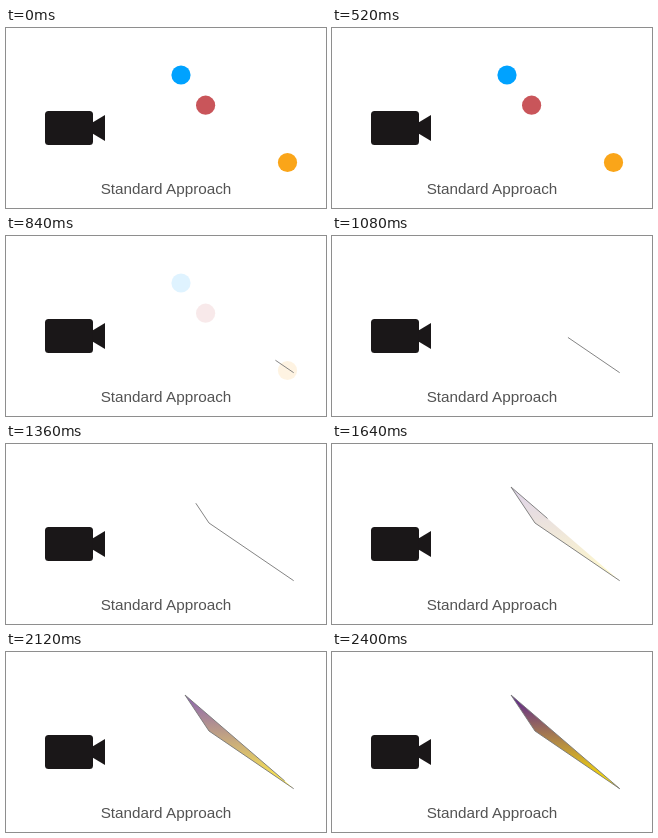
Recreate the animation shown at these times as an HTML page. Size 320x180 px, loop 2920 ms.

```html
<!DOCTYPE html>
<html lang="en">
<head>
<meta charset="utf-8">
<title>Standard Approach</title>
<style>
  html, body { margin: 0; width: 100%; height: 100%; overflow: hidden; background: #fff; }
  svg { display: block; width: 100vw; height: 100vh; }
  text { font: 15.25px "Liberation Sans", Arial, sans-serif; fill: #535353; text-anchor: middle; }
</style>
</head>
<body>
<svg viewBox="0 0 320 180">
  <defs>
    <linearGradient id="shade" gradientUnits="userSpaceOnUse" x1="0" y1="43" x2="0" y2="128">
      <stop offset="0" stop-color="#5a2391"/>
      <stop offset="1" stop-color="#f8da08"/>
    </linearGradient>
  </defs>
  <g fill="#1a1718">
    <rect x="39" y="83" width="48" height="34" rx="3.5"/>
    <path d="M86.5 94.5 99 87V113L86.5 105.5Z"/>
  </g>
  <text x="160" y="165.5">Standard Approach</text>
  <g id="dots">
    <circle cx="175" cy="47" r="9.6" fill="#00a2ff"/>
    <circle cx="199.6" cy="77.2" r="9.6" fill="#c9555a"/>
    <circle cx="281.5" cy="134.5" r="9.6" fill="#faa519"/>
  </g>
  <path id="face" d="M287.7 136.7 203 79 179 43Z" fill="url(#shade)"/>
  <path id="edge" d="M287.7 136.7 203 79 179 43Z" fill="none" stroke="#777" stroke-width=".9" pathLength="1"/>
</svg>
<script>
  const LOOP = 2920, STEP = 40;
  const [dots, face, edge] = ['dots', 'face', 'edge'].map(id => document.getElementById(id));
  const progress = (t, from, to) => Math.min(1, Math.max(0, (t - from) / (to - from)));
  const ease = x => (1 - Math.cos(Math.PI * x)) / 2;

  function draw(now) {
    const t = Math.floor(now % LOOP / STEP) * STEP;
    const traced = ease(progress(t, 510, 2360));
    dots.setAttribute('opacity', 1 - ease(progress(t, 500, 940)));
    face.setAttribute('opacity', progress(t, 1450, 2400));
    edge.setAttribute('stroke-dasharray', traced < 1 ? `${traced} 2` : 'none');
    edge.setAttribute('visibility', traced > 0 ? 'visible' : 'hidden');
  }

  const start = performance.now();
  function tick() {
    draw(performance.now() - start);
    requestAnimationFrame(tick);
  }
  tick();
</script>
</body>
</html>
```
